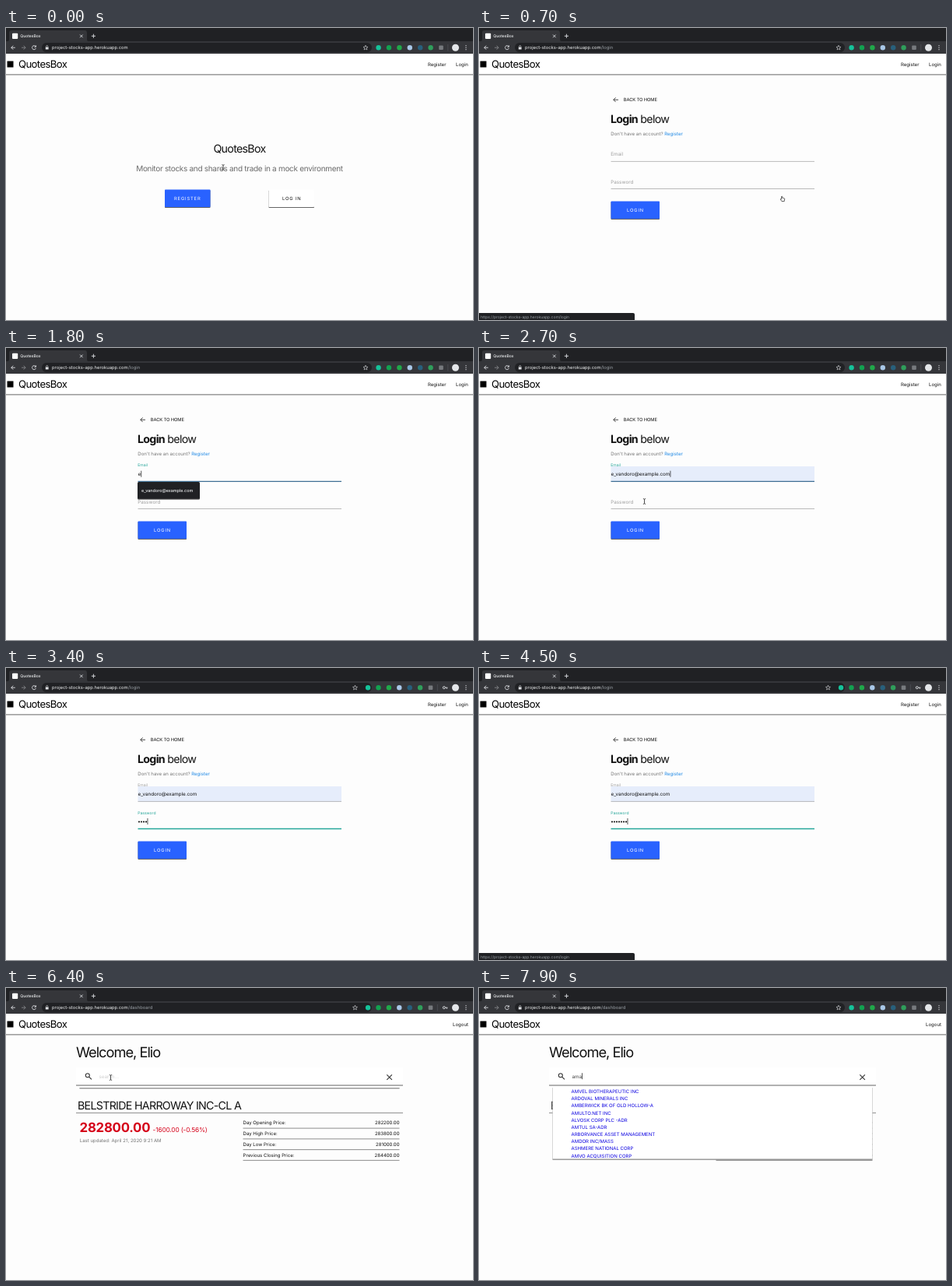
Write an HTML page that moves like this. It is 600 px wide and 375 px high and loops after 8000 ms.

```html
<!DOCTYPE html>
<html lang="en">
<head>
<meta charset="utf-8">
<title>QuotesBox</title>
<style>
  html, body { margin: 0; width: 100%; height: 100%; overflow: hidden; background: #fdfdfd; }
  svg { display: block; width: 100vw; height: 100vh; }
  text { font: 6.05px Inter, "Open Sans", sans-serif; fill: #111; text-rendering: geometricPrecision; white-space: pre; }
  .h4 { font-size: 14.25px; letter-spacing: -.05em; }
  .brand { font-size: 13.1px; letter-spacing: -.045em; fill: #000; }
  .btn { font-size: 5.83px; letter-spacing: .83px; }
  .field { font-size: 6.25px; }
  .grey { fill: #757575; }
  .card { fill: #fff; filter: drop-shadow(0 1px .6px #0009); }
  .blue { fill: #2962ff; }
  .line { stroke: #808080; stroke-width: .9; }
  .caret { fill: #111; width: .7px; height: 8px; }
  .icon { fill: none; stroke: #333; stroke-width: 1.1; }
  .tool { fill: none; stroke: #dfe1e5; stroke-width: .9; }
  .mid { text-anchor: middle; }
  .end { text-anchor: end; }
</style>
</head>
<body>
<svg viewBox="0 0 600 375">
  <rect width="600" height="375" fill="#fdfdfd"/>

  <g id="home">
    <text class="h4 mid" x="300" y="160">QuotesBox</text>
    <text class="mid" x="300" y="184.3" style="font-size:10px;letter-spacing:-.03em;fill:#6c6c6c">Monitor stocks and shares and trade in a mock environment</text>
    <rect class="card blue" x="204" y="207.5" width="58.5" height="22.5" rx=".8" style="fill:#2962ff"/>
    <text class="btn" x="216" y="221.1" style="fill:#fff">REGISTER</text>
    <rect class="card" x="337.5" y="207.5" width="58.5" height="22.5" rx=".8"/>
    <text class="btn" x="355" y="221.1">LOG IN</text>
  </g>

  <g id="login">
    <path class="icon" style="stroke-width:.9" d="M179 92.2H172.8M175.6 89.4L172.8 92.2L175.6 95"/>
    <text x="185.8" y="94.3" style="font-size:5.83px;letter-spacing:-.025em">BACK TO HOME</text>
    <text class="h4" x="169" y="122"><tspan font-weight="700">Login</tspan> below</text>
    <text class="grey" x="169.3" y="138">Don't have an account? <tspan fill="#1e88e5">Register</tspan></text>
    <text id="emailLabel" class="field" x="169.3">Email</text>
    <rect id="fill" x="169.5" y="152" width="261.5" height="19.5" fill="#e6edfb"/>
    <path id="emailLine" d="M169.5 171.4H431"/>
    <text id="email" class="field" x="169.5" y="164.3"></text>
    <rect id="emailCaret" class="caret" y="157.7"/>
    <text id="passLabel" class="field" x="169.3">Password</text>
    <path id="passLine" d="M169.5 206.5H431"/>
    <path id="dots" stroke="#111" stroke-width="2.2" stroke-linecap="round" stroke-dasharray="0 3"/>
    <rect id="passCaret" class="caret" y="193"/>
    <rect class="card blue" x="169.5" y="222.5" width="62.5" height="22.5" rx=".8"/>
    <text class="btn" x="190" y="236.1" style="fill:#fff">LOGIN</text>
    <g id="hint">
      <rect class="card" x="169" y="172" width="80" height="21.8" rx="1.5" style="fill:#202124"/>
      <text x="174" y="185" style="font-size:5.4px;font-weight:500;fill:#f1f3f4">e_vandoro@example.com</text>
    </g>
  </g>

  <g id="dash">
    <text x="90" y="89" style="font-size:18.25px;letter-spacing:-.055em">Welcome, Elio</text>
    <g id="quote">
      <text class="h4" x="92" y="155.6">BELSTRIDE HARROWAY INC-CL A</text>
      <path class="line" d="M90 160.4H510"/>
      <text x="94.6" y="185.2" style="font-size:16.8px;font-weight:700;letter-spacing:-.015em;fill:#d50019">282800.00</text>
      <text x="188.6" y="185.2" style="font-size:8.3px;letter-spacing:-.02em;fill:#d50019">-1600.00 (-0.56%)</text>
      <text class="grey" x="94.8" y="198.3">Last updated: April 21, 2020 9:21 AM</text>
      <g id="prices"></g>
    </g>
    <g id="search">
      <rect id="drop" class="card" x="94.5" y="127" width="411"/>
      <g id="results"></g>
      <rect class="card" x="90" y="102" width="420" height="22.5" rx=".6"/>
      <g id="icons" class="icon">
        <circle cx="104.8" cy="112.3" r="2.5"/>
        <path d="M106.6 114.1L110 117.4M489.3 111.3L495.9 117.9M495.9 111.3L489.3 117.9"/>
      </g>
      <text id="query" class="field" x="119.5" y="115.8"></text>
      <rect id="queryCaret" class="caret" y="109.2"/>
    </g>
  </g>

  <rect class="card" x="-3" y="30" width="606" height="29.4"/>
  <rect x="1.5" y="42.5" width="8" height="8"/>
  <text class="brand" x="16" y="51">QuotesBox</text>
  <g id="guest">
    <text x="542" y="48.5">Register</text>
    <text x="578" y="48.5">Login</text>
  </g>
  <text id="member" class="end" x="594" y="48.5">Logout</text>

  <rect width="600" height="17.5" fill="#202124"/>
  <rect y="17" width="600" height="16" fill="#35363a"/>
  <path d="M1 17.5Q4 17.5 4 14.5V6Q4 3 7 3H101Q104 3 104 6V14.5Q104 17.5 107 17.5Z" fill="#35363a"/>
  <rect x="8" y="6.7" width="7.2" height="7.2" rx="1" fill="#fff"/>
  <text x="18.3" y="12.2" style="font-size:5px;font-weight:500;fill:#f1f3f4">QuotesBox</text>
  <path class="tool" d="M95 8.6L98.6 12.2M98.6 8.6L95 12.2M109.8 10.3H115M112.4 7.7V12.9"/>
  <rect x="46" y="19" width="424" height="12.2" rx="6.1" fill="#202124"/>
  <path class="tool" d="M11.8 25.2H6.8M9.2 22.7L6.7 25.2L9.2 27.7"/>
  <path class="tool" style="stroke:#85878a" d="M20 25.2H25M22.6 22.7L25.1 25.2L22.6 27.7"/>
  <path class="tool" d="M38 23.6A2.5 2.5 0 1 0 38.4 26M38.5 22.4V24.3H36.5"/>
  <path d="M50.8 24.5H54.6V27.5H50.8Z" fill="#dfe1e5"/>
  <path class="tool" style="stroke-width:.6" d="M51.6 24.5V23.6A1.1 1.1 0 0 1 53.8 23.6V24.5"/>
  <text x="59" y="27.2" style="font-size:5.83px;fill:#f1f3f4">project-stocks-app.herokuapp.com<tspan id="path" fill="#9aa0a6"></tspan></text>
  <g id="tools">
    <path class="tool" style="stroke-width:.6" d="M462 22.2L462.8 24.2L465 24.4L463.3 25.8L463.9 27.9L462 26.8L460.1 27.9L460.7 25.8L459 24.4L461.2 24.2Z"/>
    <path d="M567.8 21V29.5" stroke="#5f6368" stroke-width=".5"/>
  </g>
  <g id="key" class="tool">
    <circle cx="562.8" cy="25.2" r="1.5"/>
    <path d="M564.3 25.2H567.4M566.4 25.2V26.8"/>
  </g>
  <circle cx="577.5" cy="25.2" r="4.5" fill="#e4e6e9"/>
  <path d="M591 22.7V28" stroke="#dfe1e5" stroke-width="1.3" stroke-linecap="round" stroke-dasharray="0 2.5"/>

  <g id="status">
    <path d="M0 366H198Q200 366 200 368V375H0Z" fill="#202124"/>
    <text x="2" y="372.6" style="font-size:5px;fill:#9aa0a6">https://project-stocks-app.herokuapp.com/login</text>
  </g>

  <g id="pointer">
    <path id="beam" fill="none" stroke="#222" stroke-width=".8" d="M-1.6 -3.4Q0 -3.4 0 -2.4Q0 -3.4 1.6 -3.4M0 -2.4V2.4M-1.6 3.4Q0 3.4 0 2.4Q0 3.4 1.6 3.4"/>
    <path id="arrow" fill="#111" stroke="#fff" stroke-width=".5" d="M0 0V6.4L1.5 5L2.5 7.2L3.5 6.8L2.5 4.6H4.6Z"/>
    <path id="hand" fill="#fff" stroke="#222" stroke-width=".7" stroke-linejoin="round" d="M-1.4 -2.6Q-.9 -3.4 -.4 -2.6V-.9L1.9 -.5Q2.8 -.2 2.7 .8L2.2 3.6H-1L-2.8 .9Q-2.7 0 -1.4 .8Z"/>
  </g>
</svg>

<script>
const LOOP = 8000, STEP = 100;
const ui = {};
document.querySelectorAll("[id]").forEach(el => ui[el.id] = el);

const set = (el, attrs) => { for (const k in attrs) el.setAttribute(k, attrs[k]); };
const show = (el, on) => { el.style.display = on ? "" : "none"; };
const add = (parent, markup) => parent.insertAdjacentHTML("beforeend", markup);
const clamp = v => Math.max(0, Math.min(1, v));
const ease = v => v * v * (3 - 2 * v);

[["Day Opening", "282200.00"], ["Day High", "283800.00"], ["Day Low", "281000.00"], ["Previous Closing", "284400.00"]]
  .forEach(([name, value], i) => {
    const y = 175.3 + i * 13.75;
    add(ui.prices, `<text x="304.6" y="${y}">${name} Price:</text><text class="end" x="505.5" y="${y}">${value}</text>
      <path class="line" d="M304.5 ${y + 4.8}H505.5"/>`);
  });

["AMVEL BIOTHERAPEUTIC INC", "ARDOVAL MINERALS INC", "AMBERWICK BK OF OLD HOLLOW-A", "AMULTO.NET INC",
 "ALVOSK CORP PLC -ADR", "AMTUL SA-ADR", "ARBORVANCE ASSET MANAGEMENT", "AMDOR INC/MASS",
 "ASHMERE NATIONAL CORP", "AMVO ACQUISITION CORP"]
  .forEach((name, i) => add(ui.results, `<text x="118.5" y="${135 + i * 9.17}" style="fill:#0b00e0">${name}</text>`));

["#15c39a", "#12a150", "#20a84a", "#a9c8e8", "#28607c", "#2f9e5b"]
  .forEach((color, i) => add(ui.tools, `<circle cx="${478.6 + i * 13.4}" cy="25.2" r="3.2" fill="${color}"/>`));
add(ui.tools, `<rect x="556.2" y="22.4" width="5.6" height="5.6" rx="1" fill="#777a7e"/>`);

// time, x, y, shape taken from that time on
const trail = [
  [0, 279, 179, "beam"], [100, 290, 184, "arrow"], [300, 365, 214, "hand"], [500, 390, 219, "hand"],
  [900, 390, 219, "arrow"], [1300, 215, 164, "beam"], [1400, 210, 162, "beam"], [1600, 210, 162, ""],
  [2000, 210, 166, "beam"], [2100, 211, 178, "arrow"], [2300, 212, 184, "arrow"], [2400, 212, 186, "beam"],
  [2600, 212.5, 197, "beam"], [3000, 212.5, 197, ""], [4900, 212.5, 197, "arrow"],
  [5500, 138, 116, "beam"], [5600, 134.5, 115, "beam"], [7300, 134.5, 115, ""], [LOOP, 134.5, 115, ""]
];

// value of the last [time, value] pair already reached
const at = (t, steps) => steps.reduce((v, s) => t >= s[0] ? s[1] : v, steps[0][1]);

function movePointer(t) {
  const i = trail.findIndex(k => k[0] > t);
  const [t0, x0, y0, shape] = trail[i - 1], [t1, x1, y1] = trail[i];
  const p = (t - t0) / (t1 - t0);
  set(ui.pointer, { transform: `translate(${x0 + (x1 - x0) * p} ${y0 + (y1 - y0) * p})` });
  for (const s of ["beam", "arrow", "hand"]) show(ui[s], s === shape);
}

function floatLabel(el, y, p, color) {
  set(el, { y: y - 12 * p });
  el.style.fontSize = 6.25 - 1.25 * p + "px";
  el.style.fill = color;
}

function render(t) {
  const page = at(t, [[0, "home"], [600, "login"], [4600, "dash"]]);
  for (const p of ["home", "login", "dash"]) show(ui[p], p === page);
  show(ui.guest, page !== "dash");
  show(ui.member, page === "dash");
  ui.path.textContent = at(t, [[0, ""], [600, "/login"], [4600, "/dashboard"]]);
  show(ui.status, (t >= 300 && t < 1100) || (t >= 4300 && t < 5100));
  const saved = t >= 2900 && t < 7500;
  show(ui.key, saved);
  set(ui.tools, { transform: `translate(${saved ? -13.5 : 0} 0)` });

  // Login form
  const inEmail = t >= 1300 && t < 2800, inPass = t >= 2800, filled = t >= 2300;
  floatLabel(ui.emailLabel, 164.3, ease(clamp((t - 1200) / 200)), inEmail ? "#26a69a" : "#9e9e9e");
  floatLabel(ui.passLabel, 199.6, ease(clamp((t - 2700) / 200)), inPass ? "#26a69a" : "#9e9e9e");
  set(ui.emailLine, { stroke: inEmail ? "#3f6f94" : "#9e9e9e", "stroke-width": inEmail ? 1.2 : .7 });
  set(ui.passLine, { stroke: inPass ? "#26a69a" : "#9e9e9e", "stroke-width": inPass ? 1.3 : .7 });
  ui.email.textContent = at(t, [[0, ""], [1600, "e"], [2300, "e_vandoro@example.com"]]);
  show(ui.fill, filled);
  show(ui.hint, t >= 1700 && !filled);
  show(ui.emailCaret, inEmail);
  const dots = at(t, [[0, 0], [3000, 1], [3100, 2], [3300, 3], [3400, 4], [3900, 5], [4000, 6], [4200, 7]]);
  show(ui.dots, dots > 0);
  set(ui.dots, { d: `M171 197.5h${Math.max(0, dots - 1) * 3 + .01}` });
  set(ui.passCaret, { x: 169.6 + dots * 3 });
  show(ui.passCaret, inPass && !(t >= 3700 && t < 3900));

  // Dashboard
  const query = at(t, [[0, ""], [7300, "a"], [7400, "am"], [7600, "ama"]]);
  show(ui.search, t >= 4800);
  show(ui.quote, t >= 5100);
  show(ui.results, t >= 7700);
  set(ui.drop, { height: t >= 7700 ? 92.6 : 1.3 });
  set(ui.icons, { opacity: clamp((t - 5600) / 300) });
  ui.query.textContent = query || "search...";
  ui.query.style.fill = query ? "#444" : "#d0d0d0";
  show(ui.queryCaret, at(t, [[0, false], [5700, true], [6400, false], [6700, true], [7100, false], [7300, true]]));

  if (page === "login") set(ui.emailCaret, { x: 169.8 + ui.email.getComputedTextLength() });
  if (page === "dash") set(ui.queryCaret, { x: 119.6 + (query ? ui.query.getComputedTextLength() : 0) });
  movePointer(t);
}

const start = performance.now();
function frame() {
  const t = (performance.now() - start) % LOOP;
  render(Math.floor(t / STEP) * STEP);
  requestAnimationFrame(frame);
}
frame();
</script>
</body>
</html>
```
